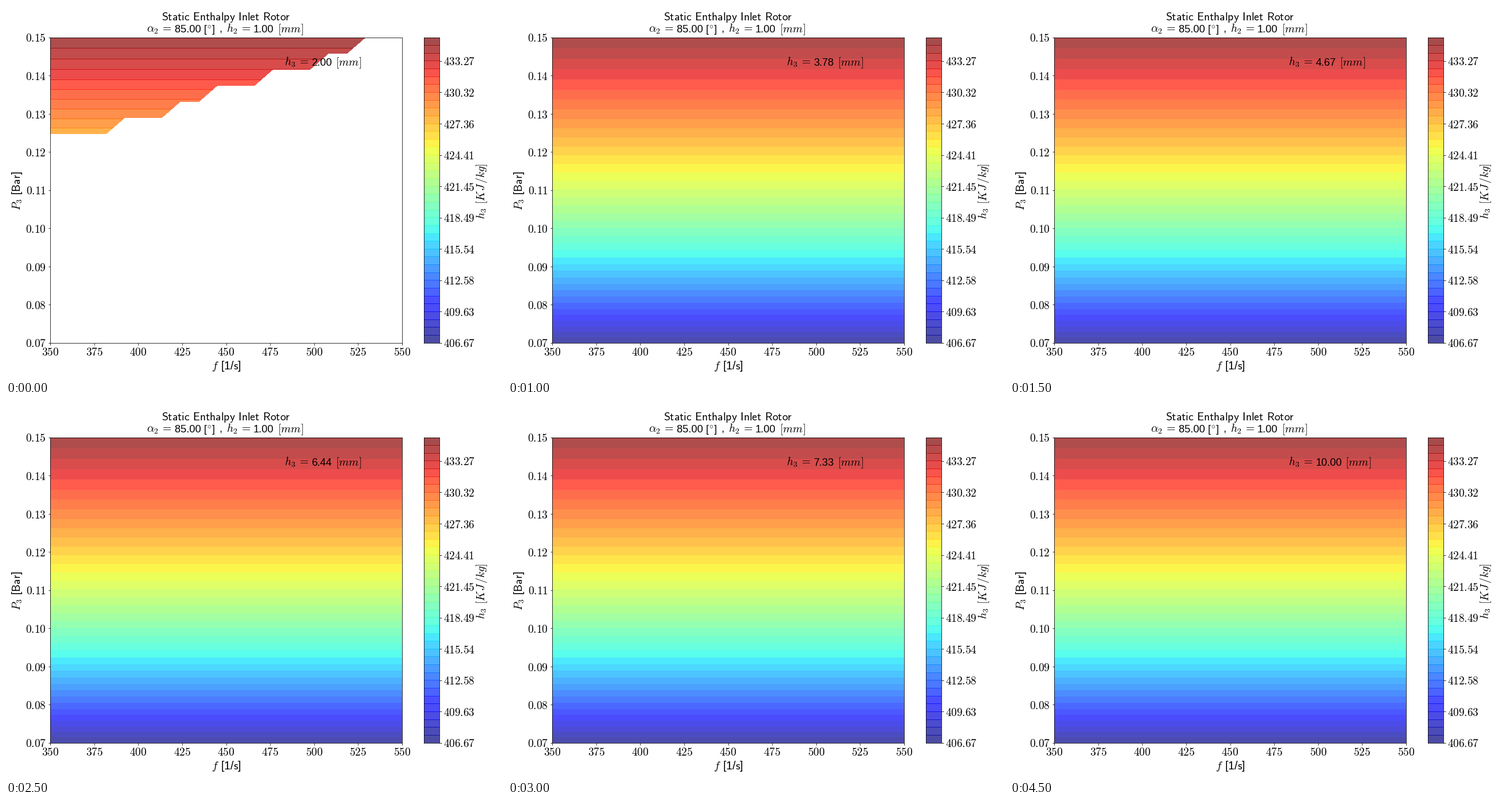
Recreate the animation shown at these times as a matplotlib script. Size 864 px wide and 648 px high, loop 5000 ms.

```python
import numpy as np
import matplotlib.pyplot as plt
from matplotlib.animation import FuncAnimation

W, H = 864, 648
FRAMES, INTERVAL = 10, 500
SIZE, PLAIN_SIZE = 19.7, 18.3
ALPHA = 0.7

plt.rcParams["mathtext.fontset"] = "cm"

# Mathtext pieces: a word space, and "=" padded to word spaces
SP = r"\hspace{0.38}"
EQ = r"\hspace{0.18}=\hspace{0.18}"


def sans(s):
    return r"$\mathsf{%s}$" % s.replace(" ", SP)


fig = plt.figure(figsize=(W / 72, H / 72), dpi=72, facecolor="white")


def add_axes(left, right, top=55, bottom=587):
    return fig.add_axes([left / W, 1 - bottom / H,
                         (right - left) / W, (bottom - top) / H])


def label(x, y, s, ha="left", size=SIZE, rotation=0):
    return fig.text(x / W, 1 - y / H, s, fontsize=size, ha=ha,
                    family="Liberation Sans", va="baseline",
                    rotation=rotation, rotation_mode="anchor")


def plain(x, y, s):
    return label(x, y, s, size=PLAIN_SIZE)


# Enthalpy field on a 20 x 20 grid
N = 20
freq = np.linspace(350, 550, N)
pres = np.linspace(0.07, 0.15, N)
K = 0.07
rise = (pres**K - pres[0]**K) / (pres[-1]**K - pres[0]**K)
H_MIN, H_MAX = 406.672, 435.489
field = np.repeat((H_MIN + (H_MAX - H_MIN) * rise)[:, None], N, axis=1)
levels = np.linspace(field.min(), field.max(), 40)

# Lowest reachable pressure row per column, for each stage of the sweep
cols = np.arange(N)
floors = [
    13 + np.searchsorted([4, 7, 9, 12, 15, 17, 18], cols, side="right"),
    2 + (cols + 2) // 5,
    np.zeros(N, int),
]

ax = add_axes(77, 690)
maps = []
for floor in floors:
    z = np.ma.masked_where(cols[:, None] < floor[None, :], field)
    maps.append(ax.contourf(freq, pres, z, levels=levels, cmap="jet",
                            alpha=ALPHA))
ax.set_xlim(350, 550)
ax.set_ylim(0.07, 0.15)
ax.set_xticks(np.arange(350, 551, 25))
ax.set_yticks(np.linspace(0.07, 0.15, 9))
ax.xaxis.set_major_formatter("${x:.0f}$")
ax.yaxis.set_major_formatter("${x:.2f}$")
ax.tick_params(labelsize=19.4)

# Colour bar: unsnapped translucent bands overlap by one pixel row
cax = add_axes(728.3, 754.9)
jet = plt.get_cmap("jet")(np.linspace(0, 1, len(levels) - 1))
cax.barh(levels[:-1], 1, height=np.diff(levels), align="edge", color=jet,
         alpha=ALPHA, linewidth=0, antialiased=False, snap=False)
cax.set_xlim(0, 1)
cax.set_ylim(levels[0], levels[-1])
cax.set_xticks([])
cax.yaxis.tick_right()
cax.set_yticks(levels[::4])
cax.yaxis.set_major_formatter("${x:.2f}$")
cax.tick_params(labelsize=19.3)

# Title, second line in parts
label(383.5, 25, sans("Static Enthalpy Inlet Rotor"), ha="center")
label(245, 46, r"$\alpha_2" + EQ + "$")
plain(294, 46, "85.00 [")
label(350.5, 46, r"${}^{\circ}$")
plain(359, 46, "]")
plain(371, 46, ",")
label(383.5, 46, "$h_2" + EQ + "$")
plain(431, 46, "1.00")
label(473, 46, "$[mm]$")

label(383.5, 633, "$f" + SP + r"$[1/$\mathsf{s}$]", ha="center")
label(25, 322, "$P_3" + SP + r"$[$\mathsf{Bar}$]", ha="center", rotation=90)
label(834, 322, "$h_3" + SP + r"[K\hspace{0.08}J\hspace{0.11}/kg]$",
      ha="center", rotation=90)

label(485, 104, "$h_3" + EQ + "$")
number = plain(532.5, 104, "")
unit = label(574, 104, "$[mm]$")


def update(i):
    for k, m in enumerate(maps):
        m.set_visible(k == min(i, len(maps) - 1))
    text = f"{2 + 8 * i / (FRAMES - 1):.2f}"
    number.set_text(text)
    unit.set_x((574 + 10 * (len(text) - 4)) / W)
    return [*maps, number, unit]


anim = FuncAnimation(fig, update, frames=FRAMES, interval=INTERVAL,
                     repeat=True, repeat_delay=0, blit=False)
plt.show()
```
